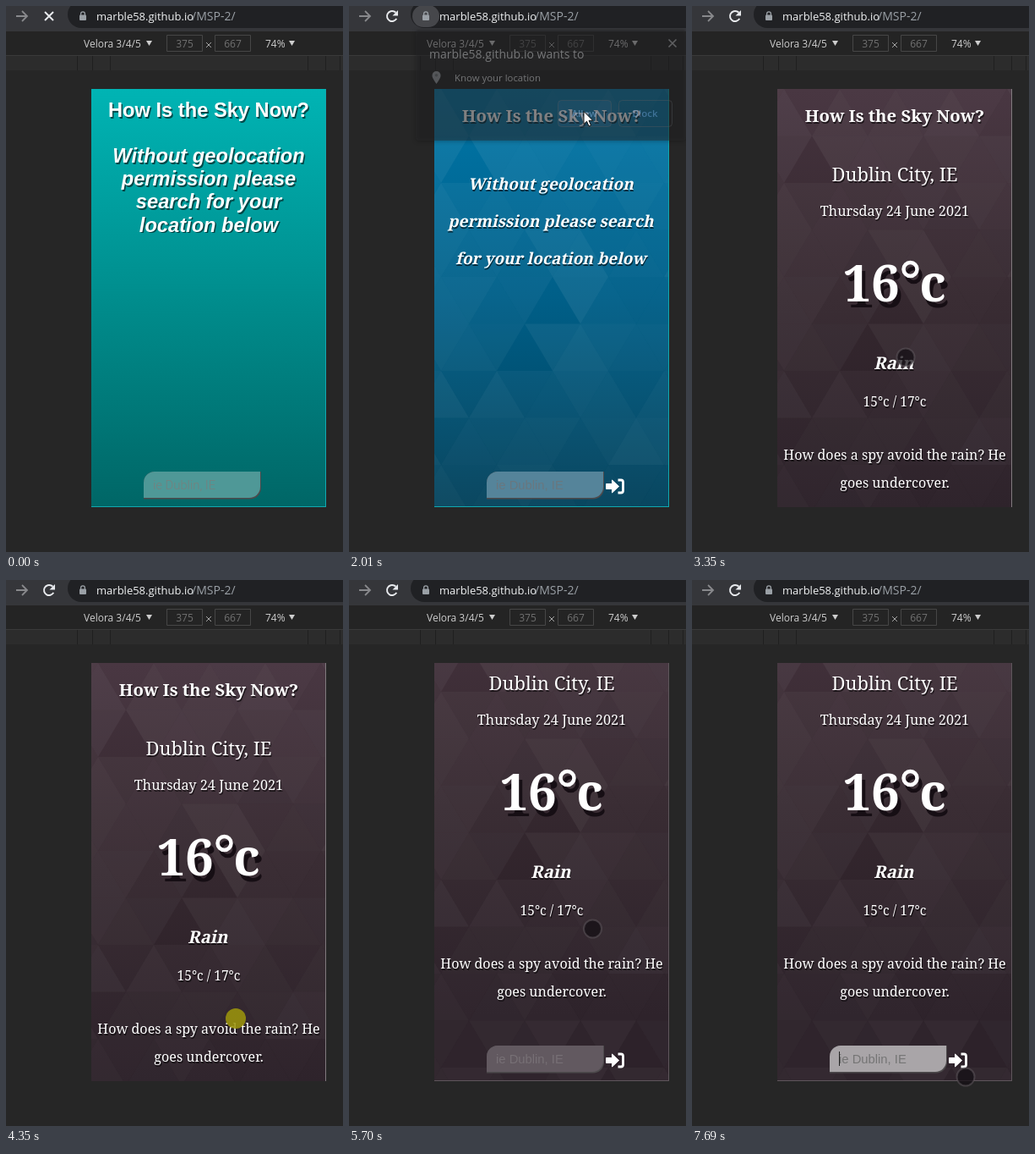
An HTML page with a canvas that plays this animation: 399x645 px, repeating every 8000 ms.

```html
<!DOCTYPE html>
<html lang="en">
<head>
<meta charset="utf-8">
<title>Weather app demo</title>
<style>
html, body { margin: 0; height: 100%; overflow: hidden; background: #262626; }
canvas { display: block; }
</style>
</head>
<body>
<canvas id="stage" width="399" height="645"></canvas>
<script>
const c = document.getElementById('stage').getContext('2d');
const SANS = '"Open Sans", "Noto Sans", sans-serif';
const ARIAL = '"Liberation Sans", Arial, sans-serif';
const SERIF = '"Noto Serif", serif';
const HOST = 'marble58.github.io', TITLE = 'How Is the Sky Now?';
const LOOP = 8000;
const PANEL = { x: 101, y: 98, w: 278, h: 494 };

// Pointer stops: time, x, y, pressed
const ARROW = [[1030, 326, 58], [1340, 277.5, 124]];
const TOUCH = [
  [2340, 278, 127], [2680, 298, 243], [3020, 291, 346], [3350, 253, 415],
  [3680, 115, 492], [4030, 272, 528], [4350, 272, 518, 1], [4690, 275, 441, 1],
  [5020, 280, 345, 1], [5370, 289, 355], [5700, 288.5, 412], [6030, 258, 552],
  [6370, 251, 566], [7030, 300, 578], [7350, 324, 587]
];
const SCROLL = [[0, 0], [4690, 62], [5020, 77]];
const at = (stops, t) => stops.filter(s => s[0] <= t).pop();

function rect(x, y, w, h, fill) {
  c.fillStyle = fill;
  c.fillRect(x, y, w, h);
}

function box(x, y, w, h, r, fill, stroke) {
  c.beginPath();
  c.roundRect(x, y, w, h, r);
  if (fill) { c.fillStyle = fill; c.fill(); }
  if (stroke) { c.strokeStyle = stroke; c.lineWidth = 1; c.stroke(); }
}

function path(d, stroke, width, fill) {
  const p = new Path2D(d);
  if (fill) { c.fillStyle = fill; c.fill(p); }
  if (stroke) { c.strokeStyle = stroke; c.lineWidth = width; c.stroke(p); }
}

function text(s, x, y, font, fill, align = 'left') {
  c.font = font;
  c.fillStyle = fill;
  c.textAlign = align;
  c.fillText(s, x, y);
}

// Centred page text with a hard shadow
function label(s, y, font, dx = 1, dy = 2, shade = 'rgba(0,0,0,.6)') {
  text(s, 240 + dx, y + dy, font, shade, 'center');
  text(s, 240, y, font, '#fff', 'center');
}

// Upright bold letters leaning right
function slanted(s, y, size) {
  c.save();
  c.transform(1, 0, -.22, 1, .22 * (y - size * .25), 0);
  label(s, y, `bold ${size}px ${SERIF}`);
  c.restore();
}

function temperature(dx, dy, color) {
  const font = 'bold 60px ' + SERIF;
  text('16', 212 + dx, 349 + dy, font, color, 'center');
  text('c', 285 + dx, 349 + dy, font, color, 'center');
  c.strokeStyle = color;
  c.lineWidth = 4.5;
  c.beginPath();
  c.arc(258.5 + dx, 311 + dy, 8, 0, 7);
  c.stroke();
}

function gradient(y, colors) {
  const g = c.createLinearGradient(0, y, 0, y + PANEL.h);
  colors.forEach((col, i) => g.addColorStop(i / (colors.length - 1), col));
  return g;
}

function triangles(strength) {
  const side = 66, h = 55.5, plain = ['1,0', '4,2', '5,1'];
  const tri = (r, k, up, x, y) => {
    if (up && plain.includes(r + ',' + k)) return;
    const n = Math.sin(r * 12.9 + k * 78.2 + up * 37.7) * 43758.5;
    c.fillStyle = `rgba(255,255,255,${strength * (.25 + .5 * (n - Math.floor(n)))})`;
    c.beginPath();
    if (up) {
      c.moveTo(x, y); c.lineTo(x + side / 2, y + h); c.lineTo(x - side / 2, y + h);
    } else {
      c.moveTo(x, y); c.lineTo(x + side, y); c.lineTo(x + side / 2, y + h);
    }
    c.fill();
  };
  for (let r = 0; r < 11; r++)
    for (let k = -1; k < 6; k++) {
      const x = 109 + r % 2 * side / 2 + k * side, y = PANEL.y + r * h;
      tri(r, k, 1, x, y);
      tri(r, k, 0, x, y);
    }
}

function search(y, fill, ink, font = '14.8px ' + ARIAL) {
  const corners = [13, 0, 13, 0];
  box(163, y, 139, 32.5, corners, '#4d4a4c');
  box(163, y, 138, 31, corners, fill);
  text('ie Dublin, IE', 174, y + 21, font, ink);
}

function enterIcon(y) {
  c.save();
  c.translate(303.5, y);
  c.lineJoin = 'round';
  path('M1 6.5H8V2L16 9.5L8 17V12.5H1Z', '#fff', 1, '#fff');
  path('M15 2H18.5Q21 2 21 4.5V14.5Q21 17 18.5 17H15', '#fff', 2.8);
  c.restore();
}

function tealPage() {
  rect(101, 98, 278, 494, gradient(98, ['#00b4b4', '#006666']));
  const font = '23.68px ' + ARIAL;
  const shade = 'rgba(0,40,40,.75)';
  label(TITLE, 131, 'bold ' + font, 1.5, 1.5, shade);
  ['Without geolocation', 'permission please', 'search for your', 'location below']
    .forEach((s, i) => label(s, 185 + i * 27.2, 'italic bold ' + font, 1.5, 1.5, shade));
  search(550, '#4f9897', '#76807e', '300 14.8px Roboto, sans-serif');
}

function bluePage() {
  rect(101, 98, 278, 494, gradient(98, ['#0076a8', '#005f88', '#003f59']));
  triangles(.1);
  label(TITLE, 137, 'bold 20.3px ' + SERIF);
  ['Without geolocation', 'permission please search', 'for your location below']
    .forEach((s, i) => slanted(s, 217 + i * 43.8, 19));
  search(550, '#55849a', '#69777f');
  enterIcon(558);
}

function weatherPage(t) {
  const y = at(SCROLL, t)[1];
  c.translate(0, -y);
  rect(101, 98, 278, 580, gradient(98, ['#45333e', '#35282f', '#281d25']));
  triangles(.08);
  label(TITLE, 137, 'bold 20.3px ' + SERIF);
  label('Dublin City, IE', 207, '500 22px ' + SERIF);
  label('Thursday 24 June 2021', 248, '500 16.3px ' + SERIF);
  temperature(4, 7, 'rgb(22,14,20)');
  temperature(0, 0, '#fff');
  slanted('Rain', 429, 20.3);
  label('15°c / 17°c', 473, '500 15.5px ' + SERIF);
  label('How does a spy avoid the rain? He', 536, '500 16.1px ' + SERIF);
  label('goes undercover.', 569, '500 16.1px ' + SERIF);
  const focus = t >= 6700;
  search(627, focus ? '#a9a5a8' : '#625960', focus ? '#757575' : '#777075');
  if (focus && !(t >= 7350 && t < 7690)) rect(174, 634, 1, 17, '#222');
  enterIcon(635);
  c.translate(0, y);
  if (t >= 4690 && t < 5370)
    box(372, 100 + y * .86, 4, 422, 2, 'rgba(140,135,138,.55)');
}

function page(t) {
  c.save();
  c.beginPath();
  c.rect(PANEL.x, PANEL.y, PANEL.w, PANEL.h);
  c.clip();
  if (t < 340) tealPage();
  else if (t < 2340) bluePage();
  else weatherPage(t);
  const edge = t < 2340 ? '#10a9b0' : t < 4690 ? '#817a7e' : '#5f565c';
  rect(378, 98, 1, 494, edge);
  if (t < 2340 || t >= 4690) rect(101, 591, 278, 1, edge);
  c.restore();
}

function browser(t) {
  rect(0, 0, 399, 30, '#35363a');
  box(73, -6, 350, 32, 16, '#202124');
  path('M12 12H25M19 6L25 12L19 18', '#88898c', 1.8);
  if (t < 340) path('M46 7L56 17M56 7L46 17', '#e8eaed', 2);
  else {
    c.strokeStyle = '#e8eaed';
    c.lineWidth = 2;
    c.beginPath();
    c.arc(51, 12, 6, .5, 5.5);
    c.stroke();
    path('M58 5V11.5H51.5Z', null, 0, '#e8eaed');
  }
  if (t >= 340 && t < 2680)
    box(75, -1, 32, 26, 13, t < 680 ? '#5f6064' : t < 2340 ? '#46474b' : '#3a3b3f');
  path('M88.6 11V9.2A2.4 2.4 0 0 1 93.4 9.2V11', '#9aa0a6', 1.3);
  box(87, 10.5, 8, 6.5, 1, '#9aa0a6');
  text(HOST, 107, 17, '13px ' + SANS, '#f1f3f4');
  text('/MSP-2/', 220, 17, '14px ' + SANS, '#9aa0a6');

  rect(0, 30, 399, 28, '#242424');
  rect(0, 58, 399, 1, '#3a3a3a');
  rect(0, 59, 399, 17, '#2c2c2c');
  [84, 102, 123, 357, 378, 395].forEach(x => rect(x, 59, 1, 17, '#1f1f1f'));
  const font = '12px ' + SANS, ink = '#cdcdcd';
  text('Velora 3/4/5', 92, 49, font, ink);
  text('74%', 307, 49, font, ink);
  [166, 335].forEach(x => path(`M${x} 41H${x + 7}L${x + 3.5} 47Z`, null, 0, ink));
  [['375', 190], ['667', 247]].forEach(([s, x]) => {
    box(x + .5, 34.5, 42, 19, 0, null, '#464646');
    text(s, x + 21.5, 49, font, '#707070', 'center');
  });
  path('M237 43L243 49M243 43L237 49', '#a5a5a5', 1);
}

function button(s, x, hot, tint) {
  box(x + .5, 109.5, 63, 31, 4, tint, '#55585d');
  text(s, x + 31.5, 129, '600 11.5px ' + SANS, hot ? '#9cc8fa' : '#7cb3ee', 'center');
}

function prompt(t) {
  if (t < 340 || t >= 2340) return;
  c.save();
  if (t >= 2010) {
    c.globalAlpha = .42;
    c.translate(5, 2);
  }
  c.shadowColor = 'rgba(0,0,0,.6)';
  c.shadowBlur = 5;
  c.shadowOffsetY = 1;
  box(74, 26, 320, 131, 4, '#292a2d');
  c.shadowColor = 'transparent';
  text(HOST + ' wants to', 90, 60, '14px ' + SANS, '#e8eaed');
  text('Know your location', 120, 87, '11.4px ' + SANS, '#e8eaed');
  path('M98.5 90C95 85 93.5 82.5 93.5 80A5 5 0 0 1 103.5 80C103.5 82.5 102 85 98.5 90Z',
    null, 0, '#9aa0a6');
  box(96.7, 78, 3.6, 3.6, 1.8, '#292a2d');
  path('M373.5 37.5L382.5 46.5M382.5 37.5L373.5 46.5', '#b4b8bc', 1.6);
  button('Allow', 242, t >= 1340, t >= 1680 ? 'rgba(138,180,248,.12)' : null);
  button('Block', 314);
  c.restore();
}

function pointer(t) {
  if (t < 1030) return;
  if (t < 2340) {
    const [, x, y] = at(ARROW, t);
    c.save();
    c.translate(x, y);
    path('M.5 .5V15.5L4 12.2L6.5 18L9 17L6.5 11.3H11.2Z', '#111', 1, '#fff');
    c.restore();
    return;
  }
  const [, x, y, down] = at(TOUCH, t);
  const faint = t < 2680;
  c.beginPath();
  c.arc(x, y, down ? 12 : 10.5, 0, 7);
  c.fillStyle = down ? 'rgba(155,148,12,.88)' : faint ? 'rgba(50,42,48,.6)' : 'rgba(20,15,20,.75)';
  c.fill();
  if (down || faint) return;
  c.strokeStyle = 'rgba(95,88,92,.55)';
  c.lineWidth = 2;
  c.stroke();
}

let start;
function draw(now) {
  start ??= now;
  const t = (now - start) % LOOP;
  rect(0, 0, 399, 645, '#262626');
  browser(t);
  page(t);
  prompt(t);
  pointer(t);
  requestAnimationFrame(draw);
}
requestAnimationFrame(draw);
</script>
</body>
</html>
```
